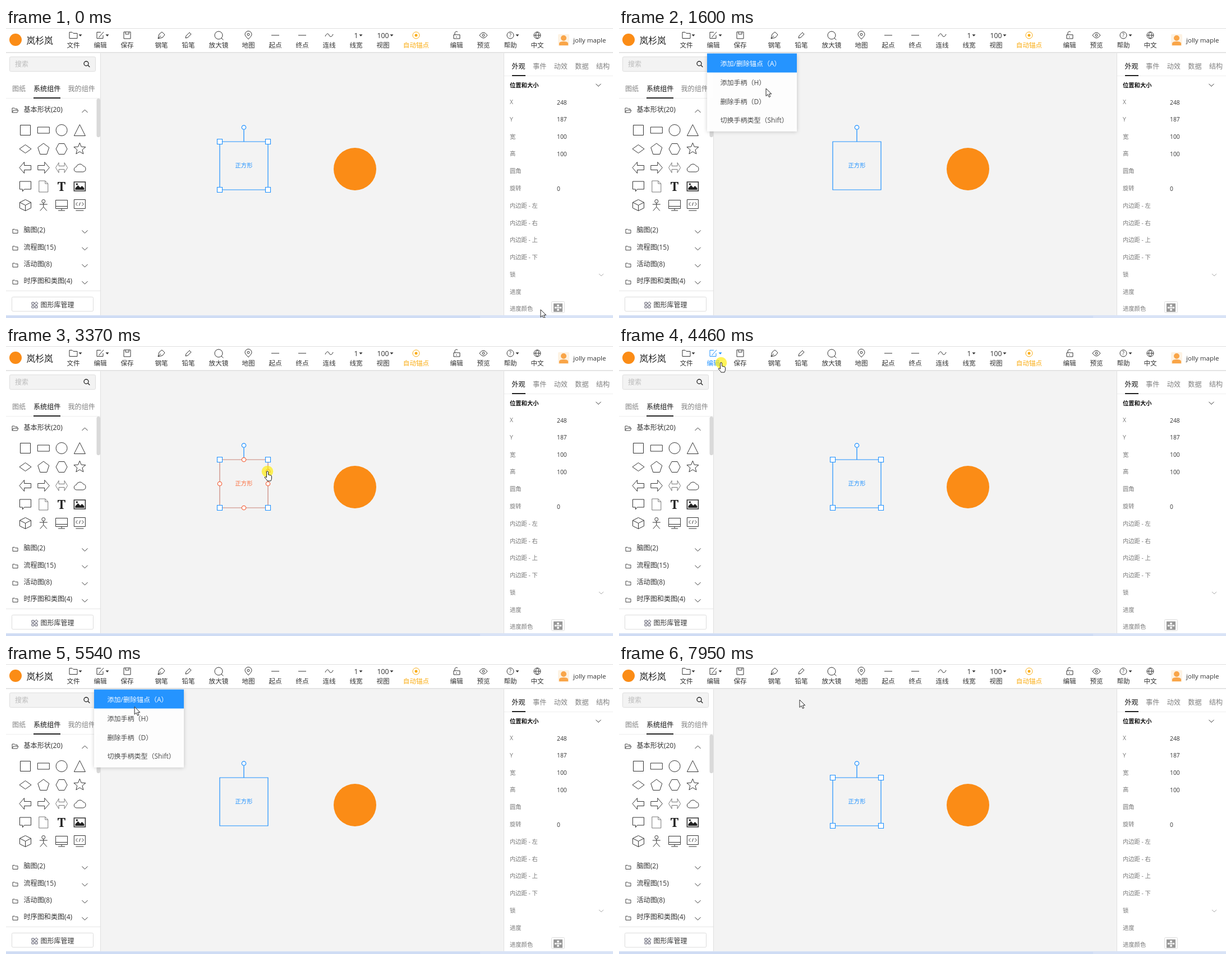
These frames come from a looping animation (1082 px wide and 518 px high, 8000 ms). An HTML page with a canvas:

```html
<!DOCTYPE html>
<html lang="zh-CN">
<head>
<meta charset="utf-8">
<title>Diagram editor</title>
<style>
html, body { margin: 0; width: 100%; height: 100%; overflow: hidden; background: #f3f3f3; }
canvas { display: block; width: 100vw; height: 100vh; }
</style>
</head>
<body>
<canvas id="stage" width="1082" height="518"></canvas>
<script>
const c = document.getElementById('stage').getContext('2d');
const FONT = '"Open Sans", "Noto Sans CJK SC", "Noto Sans CJK", sans-serif';
const LOOP = 8000, BLUE = '#1f91ff', ORANGE = '#fb8c16', INK = '#333', GREY = '#808080', ANCHOR = '#f56a45';

// Bursts of screen updates: first time, last time, count
const bursts = [
  [70, 800, 11], [890, 1370, 7], [1530, 2050, 8], [2380, 2510, 3], [2900, 3070, 3], [3210], [3370],
  [3520, 4310, 11], [4380, 4460, 2], [4610, 5390, 11], [5470, 6230, 11],
  [6330], [6560], [7170], [7340], [7640], [7870, 7950, 2]
];
// Pointer path: time, x, y
const pointer = [
  [0, 953, 503], [70, 946, 494], [800, 172, 28], [890, 172, 28], [1370, 236, 66], [1530, 242, 78],
  [1600, 262, 108], [2050, 467, 222], [2380, 465, 223], [2900, 465, 223], [3210, 466, 224], [3370, 466, 224],
  [3520, 482, 226], [3760, 580, 218], [4310, 186, 34], [4460, 182, 30], [4610, 182, 30],
  [5070, 189, 54], [5390, 196, 64], [5470, 212, 70], [6080, 613, 223], [6230, 608, 222],
  [6330, 606, 222], [6560, 606, 224], [7340, 606, 224], [7640, 606, 223], [7870, 500, 150], [7950, 322, 64]
];
const clicks = [[800, 890], [1370, 1530], [3370, 3520], [4460, 4610], [5390, 5470], [7170, 7340]];
const menus = [
  { open: 890, hover: 1150, close: 1530 },
  { open: 4610, hover: 4935, close: 5470 }
];

const clamp = v => Math.max(0, Math.min(1, v));
const mix = (a, b, p) => a + (b - a) * p;
const within = (t, a, b) => t >= a && t < b;
const rgb = (a, b, p) => `rgb(${a.map((v, i) => Math.round(mix(v, b[i], p)))})`;

function snap(t) {
  let q = 0;
  for (const [a, b = a, n = 1] of bursts) {
    if (t < a - 5) break;
    const step = n > 1 ? (b - a) / (n - 1) : 1;
    q = Math.round(a + step * Math.min(n - 1, Math.floor((t - a) / step + 0.15)));
    if (n === 1) q = a;
  }
  return q;
}

function locate(t) {
  const i = pointer.findIndex(p => p[0] > t);
  if (i < 0) return pointer[pointer.length - 1].slice(1);
  const [t0, x0, y0] = pointer[i - 1], [t1, x1, y1] = pointer[i];
  const k = (t - t0) / (t1 - t0), e = k * k * (3 - 2 * k);
  return [mix(x0, x1, e), mix(y0, y1, e)];
}

function text(s, x, y, size = 12, color = INK, align = 'left', style = '') {
  c.font = `${style} ${size}px ${FONT}`;
  c.fillStyle = color;
  c.textAlign = align;
  c.fillText(s, x, y + size * 0.37);
}
function box(x, y, w, h, fill, line, r = 0) {
  c.beginPath();
  c.roundRect(x, y, w, h, r);
  if (fill) { c.fillStyle = fill; c.fill(); }
  if (line) { c.strokeStyle = line; c.lineWidth = 1; c.stroke(); }
}
function shape(d, x, y, line = '#444', fill, width = 1) {
  const p = new Path2D(d);
  c.save();
  c.translate(x, y);
  if (fill) { c.fillStyle = fill; c.fill(p); }
  if (line) { c.strokeStyle = line; c.lineWidth = width; c.stroke(p); }
  c.restore();
}
const ring = (r, x = 0, y = 0) =>
  `M${x - r} ${y}a${r} ${r} 0 1 0 ${2 * r} 0a${r} ${r} 0 1 0 ${-2 * r} 0z`;
const caret = (x, y, color = INK) => shape('M-3-1.500H3L0 2z', x, y, null, color);
const chevron = (x, y, dir = 1, color = INK, s = 5) =>
  shape(`M${-s} ${-dir * s / 2}L0 ${dir * s / 2}L${s} ${-dir * s / 2}`, x, y, color);

const FOLDER = 'M-7 5.500v-11h5l2 2h7v9z';
const LENS = r => ring(r) + `M${r * .7} ${r * .7}l3.500 3.500`;
const star = 'M' + Array.from({ length: 10 }, (_, i) => {
  const a = i * Math.PI / 5, r = i % 2 ? 4.8 : 11;
  return `${(r * Math.sin(a)).toFixed(1)} ${(-r * Math.cos(a)).toFixed(1)}`;
}).join('L') + 'z';

// Label, x, icon path, caret x
const tools = [
  ['文件', 120, FOLDER, 132],
  ['编辑', 168, 'M1-5.500H-6v11H5V0M6-6-1 2l-1.500 2', 180],
  ['保存', 216, 'M-6-6H6V6H-6zM-3-6v4h6v-4'],
  ['钢笔', 277, 'M-6 6-4-2 1-6 6-1 2 4zM-6 6l5-5'],
  ['铅笔', 325, 'M-5 5l1-4 6-6 3 3-6 6z'],
  ['放大镜', 379, LENS(7)],
  ['地图', 432, 'M0 7Q-6 1-6-1.500a6 6 0 0 1 12 0Q6 1 0 7z' + ring(2, 0, -1.5)],
  ['起点', 480, 'M-7 0H7'],
  ['终点', 528, 'M-7 0H7'],
  ['连线', 576, 'M-7 2C-4-5-1-3 0 0S5 4 7-2'],
  ['线宽', 624, '1', 632],
  ['视图', 672, '100', 687],
  ['自动锚点', 731, ring(6)],
  ['编辑', 803, 'M-5-1H6v7H-5zM-3-1v-3a3 3 0 0 1 5-2M0 2v2'],
  ['预览', 851, 'M-7 0Q0-10 7 0Q0 10-7 0z' + ring(2)],
  ['帮助', 899, ring(6), 911],
  ['中文', 947, ring(6) + 'M-6 0H6M0-6Q-6 0 0 6Q6 0 0-6']
];
const palette = [
  'M-9-9H9V9H-9z', 'M-10.500-5.500h21v11h-21z', ring(10), 'M0-10 10 10H-10z',
  'M0-7.500 10.500 0 0 7.500-10.500 0z', 'M0-10 10-2.500 6 9.500H-6L-10-2.500z', 'M-5-9.500H5L10 0 5 9.500H-5L-10 0z', star,
  'M-10.500 0-2-10v6H10V4H-2v6z', 'M10.500 0 2-10v6H-10V4H2v6z',
  'M-10.500 0-5-9v6H5v-6L10.500 0 5 9V3H-5v6z', 'M-5 7.500a4.500 4.500 0 0 1-1-9A6.500 6.500 0 0 1 6-3a5.300 5.300 0 0 1 0 10.500z',
  'M-10-9H10V5H-2l-3 4V5h-5z', 'M-8-10H3l5 5V10H-8zM3-10v5h5', '', 'M-10-8H10V8H-10z',
  'M0-10 10-5V5L0 10-10 5V-5zM-10-5 0 0 10-5M0 0V10', ring(3, 0, -7) + 'M0-4V3M-7-1.500H7M0 3-6 10M0 3 6 10',
  'M-10.500-9h21V6h-21zM-10 2H10M0 6v3M-6 9.500H6',
  'M-10-10H10V6H-10zM-7 9.500H7M-4-5-7-2l3 3M4-5 7-2 4 1M1-5-1 1'
];

function header(editing) {
  box(0, 0, 1082, 43, '#fff');
  box(0, 0, 1082, 1, '#ddd');
  box(0, 43, 1082, 1, '#dedede');
  box(0, 44, 1082, 1, '#eaeaea');
  shape(ring(11), 17, 21, null, ORANGE);
  text('岚杉岚', 36.5, 22, 15.8, '#222');
  tools.forEach(([label, x, icon, drop], i) => {
    const color = i === 12 ? '#faad14' : i === 1 && editing ? BLUE : INK;
    text(label, x, 31, 11.6, color, 'center');
    if (i === 10 || i === 11) text(icon, x, 13.5, 12.3, color, 'center');
    else shape(icon, x, 13, color);
    if (drop) caret(drop + .5, 13, color);
  });
  shape(ring(2.5), 731, 13, null, '#faad14');
  text('?', 899, 13, 9, INK, 'center');
  box(984, 11, 20, 21, '#fdf2e3', null, 2);
  shape(ring(5, 0, -3) + 'M-8 10V6Q-7 3 0 3T8 6V10z', 994, 21, null, '#f9a548');
  text('jolly maple', 1011, 21.5, 11.6, INK);
}

function library() {
  box(0, 45, 168, 469, '#fff');
  box(168, 45, 1, 469, '#e0e0e0');
  box(6.5, 51.5, 153, 26, '#f3f3f3', '#dedede', 2);
  text('搜索', 16, 65, 12, '#bbb');
  shape(LENS(4), 143, 63.5, '#222', null, 1.3);
  text('图纸', 11, 108.5, 12.1, GREY);
  text('系统组件', 49, 108.5, 12.1, '#111');
  text('我的组件', 110.5, 108.5, 12.1, GREY);
  box(0, 125, 168, 1, '#eee');
  box(49, 124, 48, 2, '#222');
  box(161.5, 126, 6.5, 69, '#d9d9d9', null, 3);
  shape('M-5 4v-8h4l1.500 1.500H4V0M-5 4l2-4h9l-2 4z', 16, 147);
  text('基本形状(20)', 31.5, 146, 12.1);
  chevron(140.5, 148.5, -1);
  palette.forEach((d, i) => {
    const x = 34.5 + i % 4 * 32.3, y = 182.5 + Math.floor(i / 4) * 33.5;
    shape(d, x, y, i === 10 || i === 13 ? '#777' : '#333', null, i === 15 ? 1.6 : 1);
  });
  c.font = 'bold 22px "Noto Serif", "Liberation Serif", serif';
  c.fillStyle = '#222';
  c.textAlign = 'center';
  c.fillText('T', 99, 291);
  shape('M-8 6V3l5-5 4 4 3-3 4 4V6z' + ring(1.7, -5, -4), 131.4, 283, null, '#222');
  ['脑图(2)', '流程图(15)', '活动图(8)', '时序图和类图(4)'].forEach((s, i) => {
    const y = 361 + i * 30.3;
    shape('M-4.500 3.500v-7h3.500l1.300 1.300h4.200v5.700z', 16.5, y + 2);
    text(s, 31.5, y, 12.1);
    chevron(140.5, y + 3);
  });
  box(0, 469, 168, 1, '#e6e6e6');
  box(10.5, 480.5, 145, 25.5, '#fff', '#dcdcdc', 2);
  shape('M-5-5h4v4h-4zM-5 1h4v4h-4zM1 1h4v4h-4zM3-6l3 3-3 3-3-3z', 51, 495, '#556');
  text('图形库管理', 61.5, 495, 12);
}

function props() {
  box(887, 45, 1, 469, '#e0e0e0');
  box(888, 45, 194, 469, '#fff');
  ['外观', '事件', '动效', '数据', '结构'].forEach((s, i) =>
    text(s, 901.5 + i * 37.6, 69, 12.1, i ? GREY : '#111'));
  box(888, 85, 194, 1, '#eee');
  box(902, 84, 24, 2, '#222');
  text('位置和大小', 898, 102.5, 10.3, '#111', 'left', 'bold');
  chevron(1056, 102, 1, INK, 4.5);
  const rows = ['X', 'Y', '宽', '高', '圆角', '旋转', '内边距 - 左', '内边距 - 右', '内边距 - 上', '内边距 - 下', '锁', '进度', '进度颜色'];
  const values = ['248', '187', '100', '100', '', '0'];
  rows.forEach((s, i) => {
    const y = 132.3 + i * 30.78;
    text(s, 898, y, 10.3, '#777');
    if (values[i]) text(values[i], 982, y + .5, 10.3, INK);
  });
  chevron(1061, 441, 1, '#aaa', 4);
  box(972.5, 488.5, 23, 20, '#fff', '#ddd', 2);
  box(976, 492, 16, 15, '#999');
  for (let i = 0; i < 9; i++)
    if (i % 2) box(978 + i % 3 * 4.3, 494 + Math.floor(i / 3) * 4, 3.5, 3, '#fff');
  shape(ring(2), 984, 499.5, null, '#eee');
}

const dot = (x, y, color = ANCHOR) => shape(ring(3.7), x, y, color, '#fff', 1.2);

function anchors(x, y) {
  const r = 43;
  [[0, -r], [r, 0], [0, r], [-r, 0]].forEach(([dx, dy]) => dot(x + dx, y + dy));
}

function scene(t, x) {
  const picking = within(t, 1530, 3370) || within(t, 5470, 7170);
  const hot = within(t, 2380, 3560);
  shape(ring(38), 622, 252, null, ORANGE);
  shape('M0-21V0', 424, 203, BLUE, null, 1.3);
  dot(424, 177.5, BLUE);
  shape('M-43-43H43V43H-43z', 424, 246, hot ? '#c98478' : BLUE, null, 1.2);
  text('正方形', 424, 245.5, 10.3, hot ? '#fb6e3e' : BLUE, 'center');
  if (hot) {
    anchors(424, 246);
    if (t >= 2510) dot(467, 224);
  }
  if (!picking)
    for (const dx of [-43, 43])
      for (const dy of [-43, 43])
        shape('M-4.500-4.500h9v9h-9z', 424 + dx, 246 + dy, BLUE, '#fff', 1.1);
  const logoHot = within(t, 5900, 7870) && x > 579;
  if (logoHot) {
    anchors(622.5, 252);
    if (t > 6230) dot(606, 224);
  }
  return hot || logoHot;
}

function menu(t) {
  const m = menus.find(v => within(t, v.open, v.close + 250));
  if (!m) return false;
  const grow = clamp((t - m.open + 50) / 220), out = clamp((t - m.close) / 250);
  const ease = 1 - (1 - grow) ** 3;
  const p = clamp((t - m.hover) / 190);
  c.save();
  c.globalAlpha = ease * (1 - out ** 3);
  c.translate(0, 45.5);
  c.scale(1, mix(.8, 1, ease) - .1 * out * out);
  c.save();
  c.shadowColor = 'rgba(0,0,0,.2)';
  c.shadowBlur = 7;
  c.shadowOffsetY = 1;
  box(157, 0, 160, 140.5, '#fff');
  c.restore();
  box(157, 0, 160, 34.3, rgb([255, 255, 255], [31, 145, 255], p));
  ['添加/删除锚点（A）', '添加手柄（H）', '删除手柄（D）', '切换手柄类型（Shift）'].forEach((s, i) =>
    text(s, 180.5, 18 + i * 34.2, 12, i ? '#444' : rgb([68, 68, 68], [255, 255, 255], p)));
  c.restore();
  return t < m.close;
}

const ARROW = 'M0 0V13.500L3.200 10.600 5.500 15.500 7.700 14.500 5.500 9.800H9.800z';
const HAND = 'M-1.500 9V1a1.500 1.500 0 0 1 3 0V6L6 7q1.500.500 1.500 2V12q0 2-1.500 5H0q-1-2.500-5-6 .500-2.500 3.500 0z';

function draw(t) {
  const [x, y] = locate(t);
  const editing = x > 155 && x < 191 && y > 4 && y < 43;
  box(0, 0, 1082, 518, '#f3f3f3');
  const hot = scene(t, x);
  library();
  props();
  header(editing);
  box(0, 513, 1082, 5, '#d9e3f6');
  box(0, 514, 845, 4, '#cfdcf4');
  const choosing = menu(t);
  if (clicks.some(([a, b]) => within(t, a, b)))
    shape(ring(10.3), x, y, null, 'rgba(255,236,0,.65)');
  shape(editing || hot || choosing ? HAND : ARROW, x, y, '#222', '#fff');
}

const start = performance.now();
function tick(now) {
  draw(snap(Math.max(0, now - start) % LOOP));
  requestAnimationFrame(tick);
}
tick(start);
</script>
</body>
</html>
```
